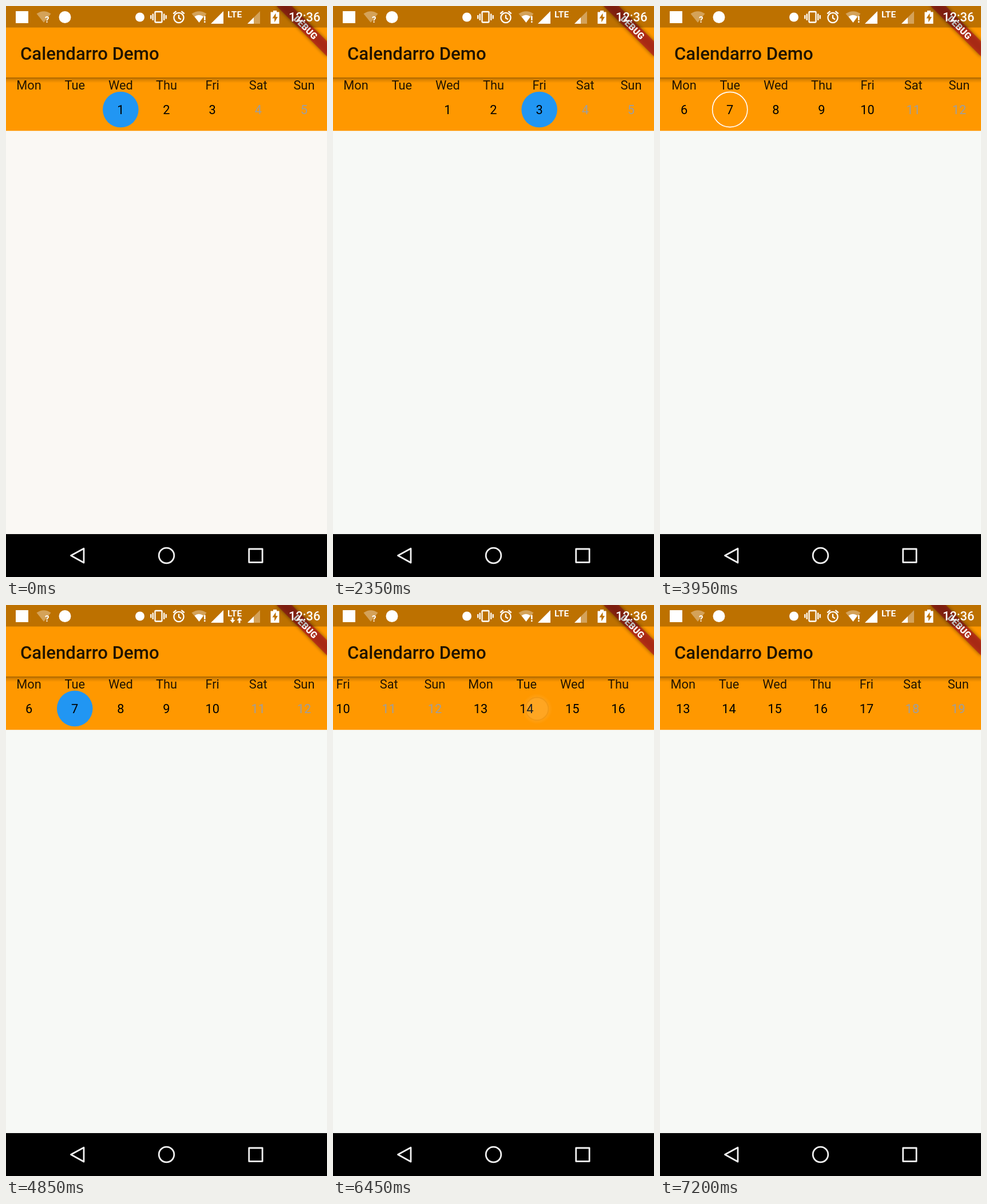
Animation, 561 px wide and 998 px high, one loop 7.3 s. Source, as an HTML page:

```html
<!DOCTYPE html>
<html lang="en">
<head>
<meta charset="utf-8">
<title>Calendar demo</title>
<style>
  html, body { margin: 0; width: 100%; height: 100%; overflow: hidden; background: #000; }
  svg { display: block; width: 100%; height: 100%; font-family: Roboto, sans-serif; }
  #week text { font-size: 21.8px; text-anchor: middle; }
</style>
</head>
<body>
<svg viewBox="0 0 561 998">
  <defs>
    <linearGradient id="shade" x1="0" y1="0" x2="0" y2="1">
      <stop offset="0" stop-color="#000" stop-opacity=".36"/>
      <stop offset=".4" stop-color="#000" stop-opacity=".14"/>
      <stop offset="1" stop-color="#000" stop-opacity="0"/>
    </linearGradient>
    <radialGradient id="glow">
      <stop offset=".75" stop-color="#fff" stop-opacity=".45"/>
      <stop offset="1" stop-color="#fff" stop-opacity="0"/>
    </radialGradient>
    <filter id="blur" x="-20%" y="-60%" width="140%" height="220%"><feGaussianBlur stdDeviation="3"/></filter>
  </defs>

  <rect id="page" y="200" width="561" height="724"/>
  <rect y="124" width="561" height="94.2" fill="#ff9800"/>
  <g id="week"></g>

  <rect y="124.7" width="561" height="10" fill="url(#shade)"/>
  <rect width="561" height="124.7" fill="#ff9800"/>
  <text x="25" y="93.5" font-size="31.2" font-weight="500" fill="#000" fill-opacity=".87">Calendarro Demo</text>

  <g transform="translate(561 0) rotate(45)">
    <rect x="-62.3" y="43.6" width="124.6" height="18.7" fill="#000" opacity=".5" filter="url(#blur)"/>
    <rect x="-62.3" y="43.6" width="124.6" height="18.7" fill="#b71c1c" fill-opacity=".72"/>
    <text y="58.6" font-size="15.9" font-weight="900" fill="#fff" text-anchor="middle">DEBUG</text>
  </g>

  <g id="status" fill="#fff">
    <rect width="561" height="37.6" fill="#000" fill-opacity=".26"/>
    <rect x="17" y="9" width="22" height="21"/>
    <path d="M53.500 13.500Q66 5 78.500 13.500L66 29Z" opacity=".35"/>
    <text x="68" y="29" font-size="15" font-weight="700">?</text>
    <circle cx="103" cy="19.500" r="10.500"/>
    <circle cx="234" cy="19.500" r="8"/>
    <g fill="none" stroke="#fff" stroke-width="2.300">
      <rect x="260.500" y="10" width="12" height="18.500" rx="1"/>
      <path d="M256.800 13.500V25M276.200 13.500V25M253.300 16V22.500M279.700 16V22.500"/>
      <circle cx="302" cy="20.500" r="8.600"/>
      <path d="M302 15.500V21L306 23.500M292.300 13.500L297.500 9.200M311.700 13.500L306.500 9.200"/>
    </g>
    <path d="M324.500 13.500Q337.500 5 350.500 13.500L337.500 29Z" opacity=".35"/>
    <path d="M329.500 18.500Q337 13 345 18.500L337.500 29Z"/>
    <path d="M346 17.500h2.600v7.500h-2.600zM346 26.500h2.600v2.600h-2.600z"/>
    <path d="M358 31H380V9Z"/>
    <text x="387" y="20" font-size="15.500" font-weight="700">LTE</text>
    <path id="data" d="M391.500 26h3v-4h3v4h3l-4.500 5.500zM403.500 27h3v4.500h3v-4.500h3l-4.500-5.500z"/>
    <path d="M422 31H444V9Z" opacity=".35"/>
    <path d="M422 31H433V20Z"/>
    <path d="M462.500 10.500H467V8H473V10.500H477.500V31H462.500Z"/>
    <path d="M471.500 12.500L465.500 21.500H469.200V28.500L475 19H471.500Z" fill="#bf7200"/>
    <text x="494" y="27" font-size="21.800" font-weight="500">12:36</text>
  </g>

  <rect y="923" width="561" height="75" fill="#000"/>
  <g fill="none" stroke="#f2f2f2" stroke-width="2.800" stroke-linejoin="round">
    <path d="M113.500 960.500L136 948.300V973Z"/>
    <circle cx="280.500" cy="960.500" r="13.300"/>
    <rect x="424.700" y="949" width="23.400" height="23.400"/>
  </g>

  <g id="touch">
    <circle r="23" fill="url(#glow)"/>
    <circle r="17" fill="#fff" fill-opacity=".6" stroke="#8c7a66" stroke-opacity=".6" stroke-width="1.800"/>
  </g>
</svg>
<script>
const LOOP = 7300, STEP = 50, WIDTH = 561, COL = WIDTH / 7;
const SLOP = 28, DRAG = 100, FADE = 150, TODAY = 7;
const NAMES = ["Mon", "Tue", "Wed", "Thu", "Fri", "Sat", "Sun"];
const touches = [
  { down: 1950, up: 2100, x: 364, y: 185.5 },
  { down: 3150, up: 3300, x: 459, y: 183, swipe: true },
  { down: 4500, up: 4650, x: 122, y: 184 },
  { down: 6150, up: 6325, x: 456.5, y: 181.5, swipe: true }
];
const $ = id => document.getElementById(id);
const week = $("week"), touch = $("touch");

function add(tag, attrs, text = "") {
  const el = document.createElementNS("http://www.w3.org/2000/svg", tag);
  for (const key in attrs) el.setAttribute(key, attrs[key]);
  el.textContent = text;
  return week.appendChild(el);
}

const dayX = day => COL * (day + 1.5);
const ring = add("circle", { cx: dayX(TODAY), cy: 181, r: 30.6, fill: "none", stroke: "#fff", "stroke-width": 1.6 });
const dot = add("circle", { cy: 181, r: 31.3, fill: "#2196f3" });
for (let day = -1; day < 20; day++) {
  const col = (day + 1) % 7, x = dayX(day);
  add("text", { x, y: 145.5, "fill-opacity": 0.87 }, NAMES[col]);
  if (day > 0) add("text", { x, y: 189, fill: col > 4 ? "#9e9e9e" : "#000" }, day);
}

const clamp = v => Math.min(1, Math.max(0, v));

// Distance the finger has been dragged, speeding up until release.
const dragged = (s, t) => s.swipe ? DRAG * clamp((t - s.down) / (s.up - s.down)) ** 2 : 0;

// Page travel: follows the finger past the slop, then an overdamped spring.
function travel(s, t) {
  if (t < s.up) return Math.max(0, dragged(s, t) - SLOP);
  const sec = (t - s.up) / 1000, gap = WIDTH - (DRAG - SLOP), slow = 724;
  return WIDTH - slow * Math.exp(-9.07 * sec) - (gap - slow) * Math.exp(-22 * sec);
}

function draw(t) {
  const scroll = touches.filter(s => s.swipe && t >= s.down).reduce((sum, s) => sum + travel(s, t), 0);
  week.setAttribute("transform", `translate(${-scroll} 0)`);

  const picked = t < 2150 ? 1 : t < 4700 ? 3 : TODAY;
  dot.setAttribute("cx", dayX(picked));
  ring.setAttribute("visibility", picked === TODAY ? "hidden" : "visible");
  $("page").setAttribute("fill", t < 2150 ? "#faf8f4" : "#f7f9f6");
  $("data").setAttribute("visibility", t >= 4550 && t < 6350 ? "visible" : "hidden");

  const s = touches.find(p => t >= p.down && t < p.up + FADE);
  touch.setAttribute("visibility", s ? "visible" : "hidden");
  if (s) {
    const gone = clamp((t - s.up) / FADE);
    touch.setAttribute("opacity", 1 - gone);
    touch.setAttribute("transform", `translate(${s.x - dragged(s, t)} ${s.y}) scale(${1 + 0.2 * gone})`);
  }
}

const start = performance.now();
function tick() {
  const t = (performance.now() - start) % LOOP;
  draw(Math.floor(t / STEP) * STEP);
  requestAnimationFrame(tick);
}
tick();
</script>
</body>
</html>
```
